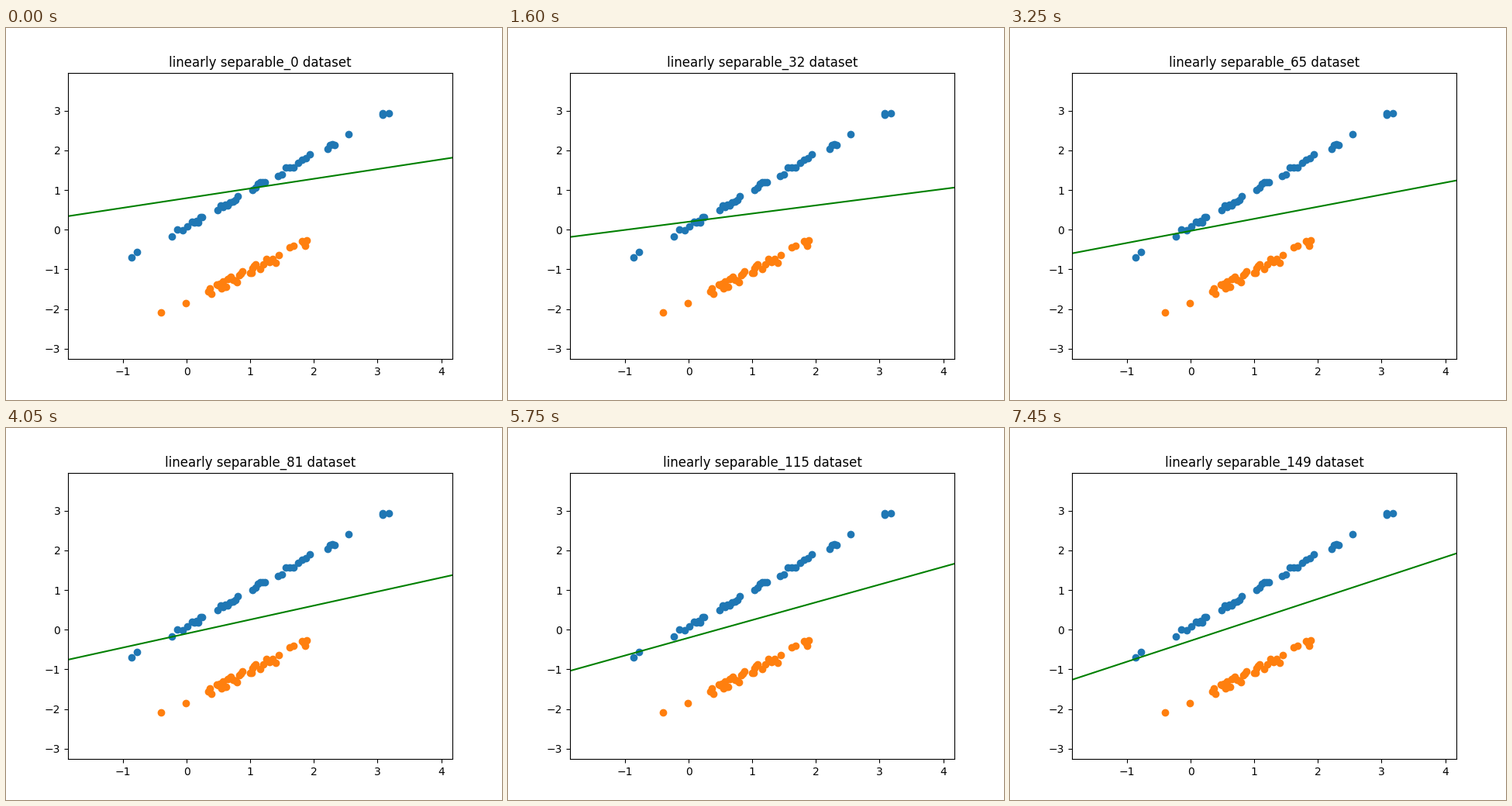
A matplotlib script that plays this animation: 640x480 px, repeating every 7500 ms.

```python
import numpy as np
import matplotlib.pyplot as plt
from matplotlib.animation import FuncAnimation

FRAMES = 150
INTERVAL = 50
XLIM = (-1.863, 4.175)
YLIM = (-3.26, 3.957)

plt.rcParams["text.kerning_factor"] = 6
rng = np.random.default_rng(1)


def band(clumps, slope, offset, spread):
    """Clumps of evenly spaced x (first, last, count) scattered about a line."""
    x = np.concatenate([np.linspace(*clump) for clump in clumps])
    y = slope * x + offset + rng.uniform(-spread, spread, x.size)
    return x, y


upper = band([(-.865, -.78, 2), (-.23, .015, 4), (.09, .245, 6),
              (.49, .805, 9), (1.04, 1.23, 6), (1.43, 1.94, 9),
              (2.21, 2.325, 4), (2.545, 3.08, 2), (3.08, 3.178, 2)],
             slope=.91, offset=.08, spread=.07)
lower = band([(-.4, -.01, 2), (.345, .385, 3), (.47, .695, 10),
              (.735, .88, 6), (1, 1.08, 5), (1.155, 1.445, 7),
              (1.62, 1.685, 2), (1.815, 1.89, 4)],
             slope=.8, offset=-1.84, spread=.12)

# Boundary height at the left and right axes edges for a few training steps
steps = np.array([0, 12, 32, 50, 81, 115, 149])
left = [.34, .14, -.19, -.42, -.755, -1.04, -1.26]
right = [1.815, 1.243, 1.073, 1.123, 1.368, 1.673, 1.918]


def log_time(step):
    return np.log(step + 20) - 4


def smooth(values):
    """Learning curve: a quartic in logarithmic time."""
    return np.poly1d(np.polyfit(log_time(steps), values, 4))


left_at, right_at = smooth(left), smooth(right)

fig, ax = plt.subplots(figsize=(6.4, 4.8), dpi=100)
ax.scatter(*upper, color="tab:blue")
ax.scatter(*lower, color="tab:orange")
line, = ax.plot([], [], color="green")
ax.set(xlim=XLIM, ylim=YLIM, xticks=range(-1, 5), yticks=range(-3, 4))
title = ax.set_title("")


def update(step):
    t = log_time(step)
    line.set_data(XLIM, (left_at(t), right_at(t)))
    title.set_text(f"linearly separable_{step} dataset")
    return line, title


anim = FuncAnimation(fig, update, frames=FRAMES, interval=INTERVAL,
                     repeat=True, repeat_delay=0)
plt.show()
```
